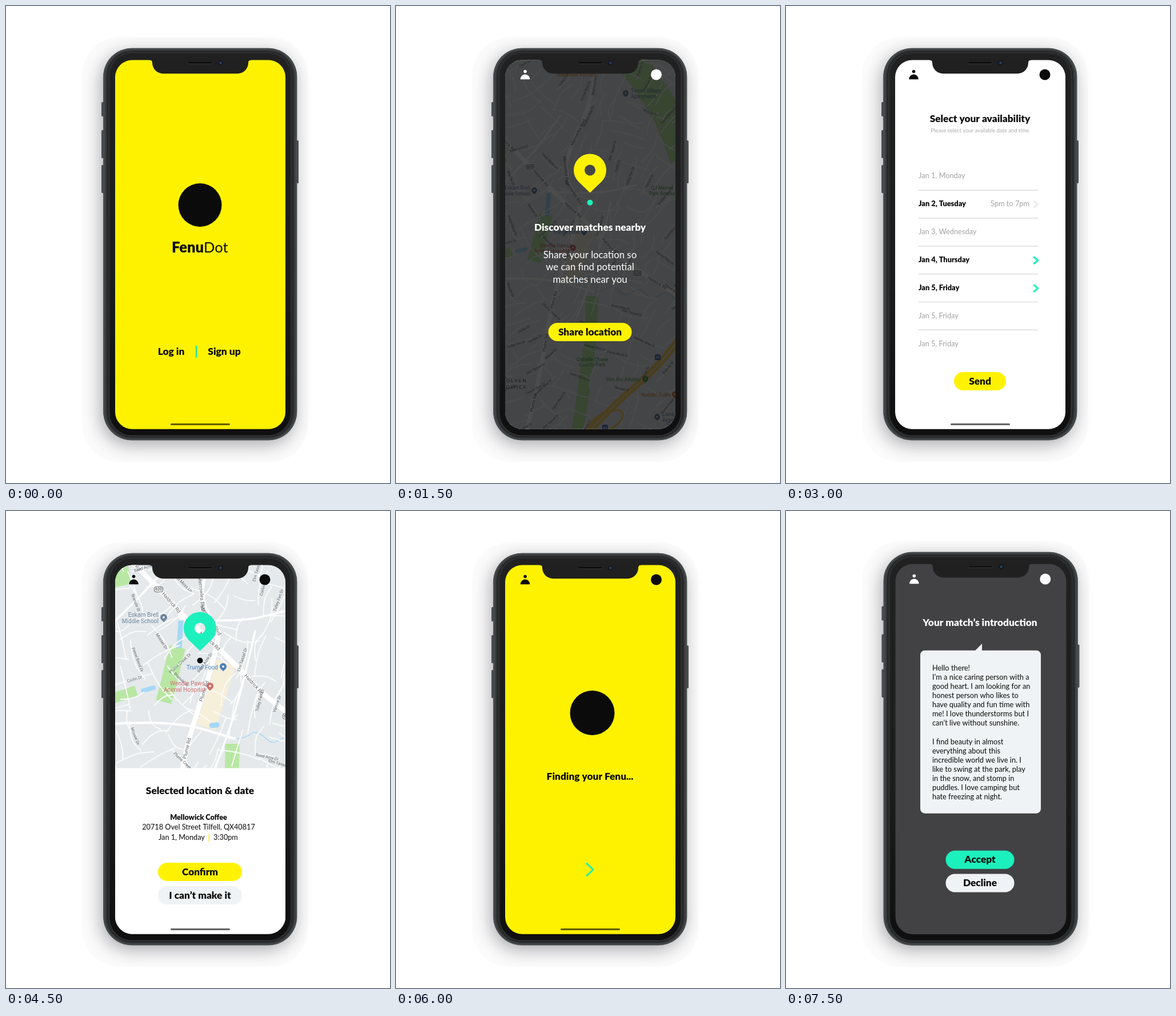
Write an HTML page with a canvas that moves like this. It is 672 by 834 pixels and loops after 9 s.

```html
<!DOCTYPE html>
<html lang="en">
<head>
<meta charset="utf-8">
<title>Dating app walkthrough</title>
<style>
  html, body { margin: 0; width: 100%; height: 100%; overflow: hidden; background: #fff; }
  canvas { display: block; width: 672px; height: 834px; }
</style>
</head>
<body>
<canvas id="stage"></canvas>
<script>
const W = 672, H = 834, HOLD = 1500, MID = 339.5;
const YELLOW = "#fff200", TEAL = "#1cf0bd", INK = "#0b0b0b", PALE = "#eff3f5", SLATE = "#424244";
const canvas = document.getElementById("stage");
const ratio = window.devicePixelRatio || 1;
canvas.width = W * ratio;
canvas.height = H * ratio;
const c = canvas.getContext("2d");

// --- drawing helpers ---
function rect(x, y, w, h, r, fill) {
  c.beginPath();
  c.roundRect(x, y, w, h, r);
  c.fillStyle = fill;
  c.fill();
}

function disc(x, y, r, fill) {
  c.beginPath();
  c.arc(x, y, r, 0, 7);
  c.fillStyle = fill;
  c.fill();
}

// Smooth line through the midpoints of the given points.
function curve(pts, width, color) {
  const n = pts.length;
  c.beginPath();
  c.moveTo(pts[0], pts[1]);
  for (let i = 2; i < n - 2; i += 2) {
    c.quadraticCurveTo(pts[i], pts[i + 1], (pts[i] + pts[i + 2]) / 2, (pts[i + 1] + pts[i + 3]) / 2);
  }
  c.lineTo(pts[n - 2], pts[n - 1]);
  c.lineWidth = width;
  c.strokeStyle = color;
  c.stroke();
}

function text(str, x, y, size, color = INK, weight = 400, align = "center", family = "Lato") {
  c.font = `${weight} ${size}px ${family}, sans-serif`;
  c.textAlign = align;
  c.fillStyle = color;
  c.fillText(str, x, y + size * 0.35);
}

const title = (str, y, color = INK) => text(str, MID, y, 17.3, color, 900);

function paragraph(rows, x, y, step, size, color, align) {
  rows.forEach((row, i) => text(row, x, y + i * step, size, color, 400, align));
}

function pill(str, y, w, fill) {
  rect(MID - w / 2, y, w, 32, 16, fill);
  text(str, MID, y + 15.5, 17.3, INK, 900);
}

function pin(x, y, r, fill) {
  const drop = r * 1.39, a = Math.acos(r / drop), down = Math.PI / 2;
  c.beginPath();
  c.arc(x, y, r, down + a, down - a + Math.PI * 2);
  c.lineTo(x, y + drop);
  c.closePath();
  c.moveTo(x + r / 3, y);
  c.arc(x, y, r / 3, 0, Math.PI * 2);
  c.fillStyle = fill;
  c.fill("evenodd");
}

function chevron(x, y, w, h, width, color) {
  c.beginPath();
  c.moveTo(x - w / 2, y - h / 2);
  c.lineTo(x + w / 2, y);
  c.lineTo(x - w / 2, y + h / 2);
  c.lineWidth = width;
  c.strokeStyle = color;
  c.stroke();
}

function topIcons(x, y, color) {
  disc(x, y - 5.5, 2.8, color);
  c.beginPath();
  c.ellipse(x, y + 8.3, 8.3, 8.8, 0, Math.PI, 0);
  c.fillStyle = color;
  c.fill();
  disc(x + 229.5, y, 9.5, color);
}

const homeBar = () => rect(288, 729.8, 104, 3.3, 1.6, "rgba(0,0,0,.6)");

// --- map ---
const STREETS = ["Corlin Dr", "Branule St", "Tulley Fen Dr", "Varrow Dr", "Fennel Rise Dr", "Wobbin Way Dr",
  "Mossel Dr", "Petrel Bend Dr", "Plume Creek Dr", "Reed Acre Dr", "Elm Tassel Dr", "Tavel Moss Ln"];
const LAND = "#6d84a0", SHOP = "#4a7fbd", CARE = "#cf6f6b", PARK = "#4f9a55", FOOD = "#d98236";

// The label stands to the left or right of its pin.
const PLACES = [
  { rows: ["Eskam Brell", "Middle School"], x: 276, y: 187, side: "left", color: LAND },
  { rows: ["Trumo Food"], x: 380, y: 273, side: "left", color: SHOP },
  { rows: ["Wendle Paws", "Animal Hospital"], x: 357, y: 307, side: "left", color: CARE },
  { rows: ["Torvell Village", "Apartments"], x: 467, y: -16, side: "right", color: LAND },
  { rows: ["Vim Arc Athletic"], x: 508, y: 581, side: "left", color: PARK },
  { rows: ["Noddin' Quills"], x: 570, y: 613, side: "left", color: FOOD },
  { rows: ["Lomber", "Region"], x: 533, y: 660, side: "right", color: LAND },
  { rows: ["Ostrelle Chase", "County Park"], x: 397, y: 545, color: PARK },
  { rows: ["QJ Mervel", "Park Soccer"], x: 543, y: 187, color: PARK },
  { rows: ["Marrowell Kitchen"], x: 364, y: -55, color: FOOD }
];

function along(str, x, y, dx, dy, size) {
  c.save();
  c.translate(x, y);
  c.rotate(Math.atan(dy / dx));
  text(str, 0, 0, size, "#62666a", 400, "center", "Roboto");
  c.restore();
}

function nameRoad(name, pts) {
  for (let i = 0; i < pts.length - 2; i += 2) {
    const dx = pts[i + 2] - pts[i], dy = pts[i + 3] - pts[i + 1];
    if (Math.hypot(dx, dy) > 48) along(name, pts[i] + dx / 2, pts[i + 1] + dy / 2, dx, dy, 8.8);
  }
}

function sideStreets() {
  let seed = 11;
  const rnd = () => (seed = seed * 16807 % 2147483647) / 2147483647;
  const labels = [];
  for (let y = -90; y < 700; y += 34) {
    for (let x = 180; x < 590; x += 36) {
      const px = x + rnd() * 30, py = y + rnd() * 28;
      const turn = Math.sin(x / 90) * 0.6 - 0.7 + (rnd() < 0.4 ? 1.5 : 0);
      const len = 18 + rnd() * 22, bend = (rnd() - 0.5) * 26;
      const ux = Math.cos(turn), uy = Math.sin(turn);
      curve([px - ux * len, py - uy * len, px - uy * bend, py + ux * bend, px + ux * len, py + uy * len], 2, "#fafbfb");
      if (rnd() < 0.22) labels.push([px, py, ux, uy]);
    }
  }
  return labels;
}

function drawPlace({ rows, x, y, side, color }) {
  const align = side === "left" ? "right" : side === "right" ? "left" : "center";
  const shift = side === "left" ? -9 : side === "right" ? 11 : 0;
  rows.forEach((row, i) =>
    text(row, x + shift, y + (i - (rows.length - 1) / 2) * 11.3, 10.2, color, 400, align, "Roboto"));
  if (side) pin(x, y - 1, 6, color);
}

function drawMap() {
  const green = "#b8e7a4", water = "#a6d8f5", road = "#fff", highway = "#f6cd62";
  c.fillStyle = "#e5e9eb";
  c.fillRect(150, -100, 460, 820);
  c.lineCap = "butt";
  curve([196, 85, 206, 130], 30, green);
  curve([300, 238, 290, 280, 276, 334], 28, green);
  curve([150, 340, 228, 314], 18, green);
  curve([396, 407, 396, 480, 385, 560, 365, 700], 25, green);
  curve([480, -80, 545, 0, 590, 120], 60, green);
  curve([386, 264, 350, 378], 34, "#f6efda");
  curve([306, 192, 303, 240], 9, water);
  c.lineCap = "round";
  curve([240, 314, 258, 309], 8, water);
  curve([360, 375, 369, 374], 9, water);
  const creek = [];
  for (let x = 405; x < 600; x += 15) creek.push(x, 390 + (x - 405) * 0.12 + 10 * Math.sin(x / 9));
  curve(creek, 1.5, water);

  const labels = sideStreets();
  curve([191, 372, 294, 366, 400, 398], 4, road);
  curve([305, 188, 402, 196, 489, 175], 3.5, road);
  curve([436, 210, 408, 335, 366, 450], 3.5, road);
  curve([191, 192, 268, 118, 330, 30], 3.5, road);
  const north = [410, -95, 395, 10, 340, 120, 345, 170, 372, 212];
  const south = [372, 212, 368, 250, 325, 380, 308, 450, 290, 560, 258, 700];
  const cross = [170, 40, 267, 134, 312, 186, 402, 268, 466, 338, 600, 420];
  for (const pts of [north, south, cross]) curve(pts, 8.5, road);
  for (const x of [375, 386]) curve([x, 700, x + 60, 635, x + 150, 560, x + 220, 470], 6, highway);
  c.beginPath();
  c.ellipse(425, 670, 40, 18, -0.5, 0, 7);
  c.lineWidth = 4;
  c.stroke();

  labels.forEach(([x, y, dx, dy], i) => along(STREETS[i % STREETS.length], x, y, dx, dy, 7.1));
  nameRoad("Merrowlea Blvd", north);
  nameRoad("Plume Rd", south);
  nameRoad("Haldrick Rd", cross);

  for (const [x, y] of [[267, 137], [492, 359]]) {
    rect(x - 8, y - 5, 16, 10, 4, "#5e6367");
    rect(x - 7, y - 4, 14, 8, 3, "#fff");
    text("620", x, y, 7, "#444", 500, "center", "Roboto");
  }
  for (const [x, y] of [[534, 535], [424, 682]]) {
    rect(x - 6, y - 6, 12, 12, 3, "#4a74b8");
    text("66", x, y, 7, "#fff", 500, "center", "Roboto");
  }
  PLACES.forEach(drawPlace);
  paragraph(["O L V E N", "O W I C K"], 238, 584, 13, 9.5, "#555", "center");
}

// --- screens ---
function fillScreen(color) {
  c.fillStyle = color;
  c.fillRect(180, 85, 320, 665);
}

function welcome() {
  fillScreen(YELLOW);
  disc(MID, 348, 38, INK);
  text("Fenu", 290, 422.5, 25.5, INK, 900, "left");
  const end = 290 + c.measureText("Fenu").width;
  text("Dot", end, 422.5, 25.5, INK, 400, "left");
  text("Log in", 289, 603.5, 17.4, INK, 900);
  text("Sign up", 382, 603.5, 17.4, INK, 900);
  rect(331.8, 594, 2.5, 21, 1, "#22e6a0");
  homeBar();
}

function nearby() {
  c.save();
  c.translate(11, 166.5);
  c.scale(0.837, 0.837);
  drawMap();
  c.restore();
  fillScreen("rgba(0,0,0,.7)");
  topIcons(226, 120, "#fff");
  pin(MID, 287, 28.5, YELLOW);
  disc(MID, 343.7, 5, TEAL);
  title("Discover matches nearby", 386.5, "#fff");
  paragraph(["Share your location so", "we can find potential", "matches near you"],
    MID, 435, 21.6, 16.8, "#fff", "center");
  pill("Share location", 554, 146, YELLOW);
}

function availability() {
  fillScreen("#fff");
  topIcons(223.5, 120, INK);
  title("Select your availability", 197);
  text("Please select your available date and time", MID, 217.5, 9.45, "#aaa");
  const days = ["Jan 1, Monday", "Jan 2, Tuesday", "Jan 3, Wednesday", "Jan 4, Thursday",
    "Jan 5, Friday", "Jan 5, Friday", "Jan 5, Friday"];
  days.forEach((day, i) => {
    const y = 297 + i * 48.85, open = [1, 3, 4].includes(i);
    text(day, 232, y, 12.8, open ? INK : "#a2a2a2", open ? 900 : 400, "left");
    if (i < 6) rect(232, y + 24.5, 209, 1.2, 0, "#d6d6d6");
    if (open) chevron(437.5, y + 1.2, 6.5, 11, 3.2, i === 1 ? "#ededed" : TEAL);
  });
  text("5pm to 7pm", 426, 345.8, 12.8, "#a2a2a2", 400, "right");
  pill("Send", 640, 91, YELLOW);
  homeBar();
}

function meeting() {
  drawMap();
  c.fillStyle = "#fff";
  c.fillRect(180, 449.5, 320, 300);
  topIcons(223.5, 120, INK);
  pin(MID, 205, 28.5, TEAL);
  disc(MID, 261.5, 5, INK);
  title("Selected location & date", 488.5);
  text("Mellowick Coffee", 337, 535.5, 12.6, INK, 900);
  text("20718 Ovel Street Tilfell, QX40817", 337, 553, 12.7);
  text("Jan 1, Monday", 267, 571, 12.7, INK, 400, "left");
  text("3:30pm", 363, 571, 12.7, INK, 400, "left");
  rect(354.5, 565, 1.6, 13, 0, "#ffe92e");
  pill("Confirm", 615, 147, YELLOW);
  pill("I can’t make it", 656, 147, PALE);
  homeBar();
}

function finding() {
  fillScreen(YELLOW);
  topIcons(226, 120, INK);
  disc(343.5, 353, 39, INK);
  title("Finding your Fenu...", 464);
  chevron(MID, 627, 11, 21, 3.1, "#1fefb0");
  homeBar();
}

function introduction() {
  fillScreen(SLATE);
  topIcons(224.3, 119, "#fff");
  title("Your match’s introduction", 194.5, "#fff");
  c.beginPath();
  c.moveTo(331, 244);
  c.lineTo(343, 232);
  c.lineTo(343, 244);
  c.fillStyle = PALE;
  c.fill();
  rect(235, 243.7, 211, 285, 8, PALE);
  const rows = ["Hello there!", "I’m a nice caring person with a", "good heart. I am looking for an",
    "honest person who likes to", "have quality and fun time with", "me! I love thunderstorms but I",
    "can’t live without sunshine.", "", "I find beauty in almost", "everything about this",
    "incredible world we live in. I", "like to swing at the park, play", "in the snow, and stomp in",
    "puddles. I love camping but", "hate freezing at night."];
  paragraph(rows, 256, 274.7, 16.04, 12.8, INK, "left");
  pill("Accept", 593.7, 120, TEAL);
  pill("Decline", 634.4, 120, PALE);
}

// --- phone ---
function body() {
  rect(133, 55, 395, 742, 66, "#fbfbfb");
  c.save();
  c.shadowColor = "rgba(25,25,40,.36)";
  c.shadowBlur = 30 * ratio;
  c.shadowOffsetX = -4 * ratio;
  c.shadowOffsetY = 8 * ratio;
  rect(170.3, 73.7, 338.9, 685.6, 50, "#474a4a");
  c.restore();
  for (const [y, h] of [[168, 25], [217, 49], [278, 49]]) rect(167, y, 5, h, 1.5, "#4b4c50");
  rect(508, 235, 4, 75, 1.5, "#4b4c50");
  // Nested rims, from the metal edge to the glass.
  const shade = c.createLinearGradient(0, 84, 0, 750);
  shade.addColorStop(0, "#212121");
  shade.addColorStop(0.6, "#1c1c1c");
  shade.addColorStop(1, "#0f0f0f");
  ["#474a4a", "#3b3d3e", "#262728", "#2e2f30", shade].forEach((fill, i) => {
    const d = i * 2.8;
    rect(170.3 + d, 73.7 + d * 0.8, 338.9 - d * 2, 685.6 - d * 1.6, 50 - d, fill);
  });
}

function notch() {
  c.beginPath();
  c.moveTo(251, 93);
  c.lineTo(251, 94.5);
  c.quadraticCurveTo(256, 94.5, 256, 99);
  c.arcTo(256, 118.3, 276, 118.3, 19);
  c.arcTo(424, 118.3, 424, 99, 19);
  c.lineTo(424, 99);
  c.quadraticCurveTo(424, 94.5, 429, 94.5);
  c.lineTo(429, 93);
  c.fillStyle = "#202020";
  c.fill();
  rect(318.5, 98, 42, 3.4, 1.7, "#3a3a3a");
  rect(319, 98, 41, 2.4, 1.2, "#0a0a0a");
  disc(375.5, 99.5, 4.3, "#11161d");
  disc(375.5, 99.5, 2.4, "#23405c");
}

const SCREENS = [welcome, nearby, availability, meeting, finding, introduction];

function draw(index) {
  const stageSpace = () => c.setTransform(ratio, 0, 0, ratio, 0, 0);
  // The last screen sits in a slightly larger phone.
  const phoneSpace = () => {
    stageSpace();
    if (index === 5) c.transform(1.003, 0, 0, 1.003, -0.1, -2.1);
  };
  stageSpace();
  c.fillStyle = "#fff";
  c.fillRect(0, 0, W, H);
  c.lineCap = c.lineJoin = "round";
  phoneSpace();
  body();
  c.save();
  c.beginPath();
  c.roundRect(191, 94.5, 298, 645.3, 30);
  c.clip();
  stageSpace();
  SCREENS[index]();
  c.restore();
  phoneSpace();
  notch();
}

let shown = -1;
const start = performance.now();

function tick() {
  const index = Math.floor((performance.now() - start) / HOLD) % SCREENS.length;
  if (index !== shown) draw(shown = index);
  requestAnimationFrame(tick);
}
tick();
</script>
</body>
</html>
```
